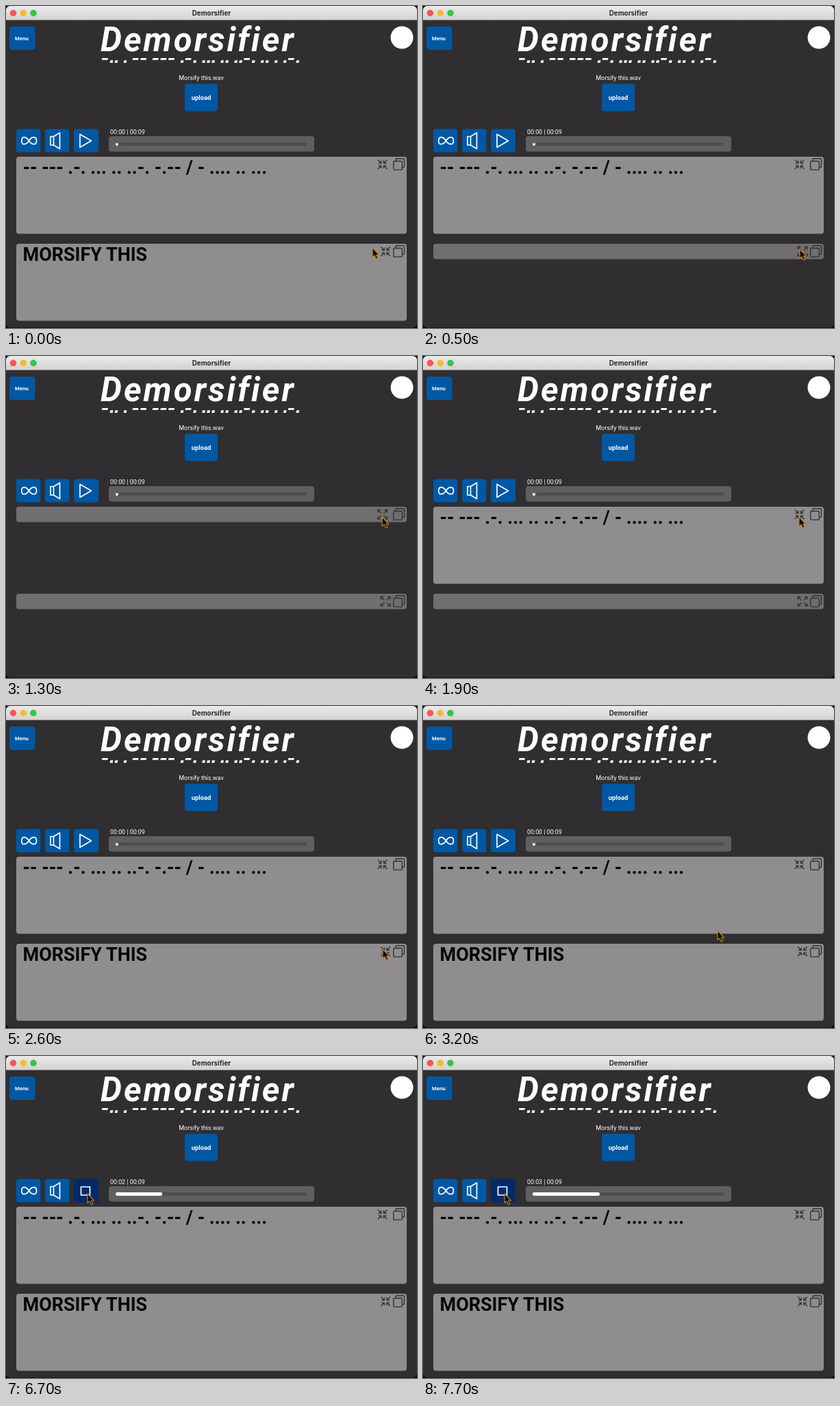
These frames come from a looping animation (600x470 px, 7.8 s). An HTML page:

```html
<!DOCTYPE html>
<html lang="en">
<head>
<meta charset="utf-8">
<title>Demorsifier</title>
<style>
  html, body { margin: 0; width: 100%; height: 100%; overflow: hidden; background: #000; }
  svg { display: block; width: 600px; height: 470px; font-family: Roboto, sans-serif; }
  .button { fill: #0058a4; }
  .line { fill: none; stroke: #fff; stroke-width: 1.7; stroke-linejoin: round; stroke-linecap: round; }
  .tool { fill: none; stroke: #343234; stroke-width: 1.4; stroke-linejoin: round; }
  .label { fill: #fff; text-anchor: middle; font-weight: 700; }
  .message { font-size: 27px; font-weight: 700; fill: #050505; }
</style>
</head>
<body>
<svg viewBox="0 0 600 470">
  <defs>
    <linearGradient id="bar" x2="0" y2="1">
      <stop stop-color="#ebe9ea"/><stop offset="1" stop-color="#d3d1d2"/>
    </linearGradient>
    <clipPath id="window"><rect width="600" height="469.5" rx="6"/></clipPath>
    <g id="copy">
      <rect x=".7" y="4.5" width="12.6" height="12.6" rx="1.5"/>
      <path d="M4 4.5V2.2Q4 .7 5.500 .7H15Q16.500 .7 16.500 2.2V12Q16.500 13.500 15 13.500H13.300"/>
    </g>
  </defs>

  <g clip-path="url(#window)">
    <rect width="600" height="470" fill="#302e30"/>
    <rect width="600" height="20.500" fill="url(#bar)"/>
    <circle cx="10.500" cy="10.300" r="4.800" fill="#f4584f"/>
    <circle cx="25.300" cy="10.300" r="4.800" fill="#f5bb2f"/>
    <circle cx="40" cy="10.300" r="4.800" fill="#35c548"/>
    <text x="300" y="13.700" text-anchor="middle" font-family="Inter, sans-serif" font-size="9.8" font-weight="700" fill="#292729">Demorsifier</text>

    <rect class="button" x="5" y="30" width="37.500" height="34" rx="4"/>
    <text class="label" x="23" y="49.600" font-size="7.800">Menu</text>
    <text x="138" y="65.500" font-size="49" font-weight="700" font-style="italic" letter-spacing="3" fill="#fff">Demorsifier</text>
    <g id="code" fill="#fff" transform="translate(139 83) skewX(-12)"></g>
    <circle cx="578" cy="46" r="16.500" fill="#fff"/>

    <text x="285" y="107.700" font-size="9" text-anchor="middle" fill="#fff">Morsify this.wav</text>
    <rect class="button" x="261" y="113.500" width="48" height="40" rx="4"/>
    <text class="label" x="285" y="136.700" font-size="9.400">upload</text>

    <rect class="button" x="15" y="179.500" width="35.500" height="34" rx="4"/>
    <rect class="button" x="57" y="179.500" width="35.500" height="34" rx="4"/>
    <rect id="play" x="99" y="179.500" width="36" height="34" rx="4"/>
    <path class="line" d="M33.500 196.700C29 190 22.800 190 22.800 196.700S29 203.400 33.500 196.700S44.500 190 44.500 196.700S38 203.400 33.500 196.700Z"/>
    <path class="line" stroke-width="1.500" d="M65 190.500H69.500V203H65ZM69.500 190.500L78.500 185V208.500L69.500 203"/>
    <path id="symbol" class="line"/>

    <text id="clock" x="152" y="186.500" font-size="8.900" fill="#fff"></text>
    <rect x="150" y="190" width="300" height="22.500" rx="4" fill="#605f60"/>
    <rect x="160" y="199" width="279" height="5" rx="2" fill="#4f4d4f"/>
    <rect id="progress" x="160" y="199" height="5" rx="2.300" fill="#fff"/>
    <path id="notch" d="M161 198.500h2v2h-2z" fill="#4f4d4f"/>

    <g id="panels"></g>
  </g>

  <path id="cursor" d="M0 0V13.500L3 10.900L5.300 16L7.800 14.800L5.600 10H9.600Z" fill="#0c0a08" stroke="#bd8420" stroke-width="1.200" stroke-linejoin="round"/>
</svg>
<script>
const LOOP = 7800;
const PLAY_START = 4433;
const byId = id => document.getElementById(id);

function make(parent, tag, attributes, text = '') {
  const node = document.createElementNS('http://www.w3.org/2000/svg', tag);
  for (const name in attributes) node.setAttribute(name, attributes[name]);
  node.textContent = text;
  parent.append(node);
  return node;
}

// Morse line under the heading
let penX = 0;
for (const sign of '-.. . -- --- .-. ... .. ..-. .. . .-.') {
  if (sign === '-') make(byId('code'), 'rect', { x: penX, y: -7, width: 8.5, height: 2.8 });
  if (sign === '.') make(byId('code'), 'rect', { x: penX + 1, y: -3.8, width: 4, height: 3.8 });
  penX += { '-': 11.6, '.': 7, ' ': 6 }[sign];
}

function arrows(inward) {
  const corner = inward ? 'M1 1L6 6M6 2V6H2' : 'M6 6L1 1M1 5V1H5';
  return corner;
}

function makePanel(y, toolX, toolY, message, closed) {
  const group = make(byId('panels'), 'g', {});
  const box = make(group, 'rect', { x: 15, y, width: 570, rx: 4 });
  const text = make(group, 'text', { class: 'message', x: 24.5, y: y + 25.3 }, message);
  const tool = make(group, 'g', { class: 'tool', transform: `translate(${toolX} ${toolY})` });
  const corners = [0, 90, 180, 270].map(angle =>
    make(tool, 'path', { transform: `rotate(${angle} 7.8 7.8)` }));
  make(group, 'use', { href: '#copy', class: 'tool', transform: `translate(565 ${y + 2})` });
  return time => {
    const isClosed = time >= closed[0] && time < closed[1];
    box.setAttribute('height', isClosed ? 22.5 : 112.5);
    box.setAttribute('fill', isClosed ? '#706e70' : '#8f8d8f');
    text.setAttribute('visibility', isClosed ? 'hidden' : 'visible');
    corners.forEach(path => path.setAttribute('d', arrows(!isClosed)));
  };
}

const panels = [
  makePanel(220, 541.8, 223.5, '-- --- .-. ... .. ..-. -.-- / - .... .. ...', [1300, 1700]),
  makePanel(347, 546.3, 350.5, 'MORSIFY THIS', [500, 2600])
];

// time, x, y of the pointer tip
const route = [
  [0, 535, 353], [300, 550, 355], [600, 550, 355], [800, 551, 332],
  [1100, 549, 235], [1900, 549, 235], [2300, 550, 355], [2700, 550, 355],
  [3200, 430, 328], [4000, 121, 202], [4500, 120.5, 202.5],
  [4900, 120.5, 202.5], [5600, 119, 201], [LOOP, 119, 201]
];

function pointerAt(time) {
  const next = route.findIndex(stop => stop[0] > time);
  const [t0, x0, y0] = route[next - 1];
  const [t1, x1, y1] = route[next];
  const part = (time - t0) / (t1 - t0);
  const eased = part * part * (3 - 2 * part);
  return [x0 + (x1 - x0) * eased, y0 + (y1 - y0) * eased];
}

function render(time) {
  panels.forEach(update => update(time));
  const [x, y] = pointerAt(time);
  byId('cursor').setAttribute('transform', `translate(${x} ${y})`);

  const hovered = x > 99 && x < 135 && y > 179 && y < 214;
  byId('play').setAttribute('fill', hovered ? '#002b69' : '#0058a4');
  byId('symbol').setAttribute('d', time >= 4400
    ? 'M109.500 191H122.500V203H109.500Z'
    : 'M108 187.200L124.500 196.700L108 206.300Z');

  const played = Math.max(0, time - PLAY_START) / 1000;
  byId('clock').textContent = `00:0${Math.floor(played)} | 00:09`;
  byId('progress').setAttribute('width', Math.max(4, played * 30));
  byId('notch').setAttribute('visibility', played < 0.12 ? 'visible' : 'hidden');
}

const start = performance.now();
function tick() {
  const time = (performance.now() - start) % LOOP;
  render(Math.floor(time / 100) * 100);
  requestAnimationFrame(tick);
}
tick();
</script>
</body>
</html>
```
